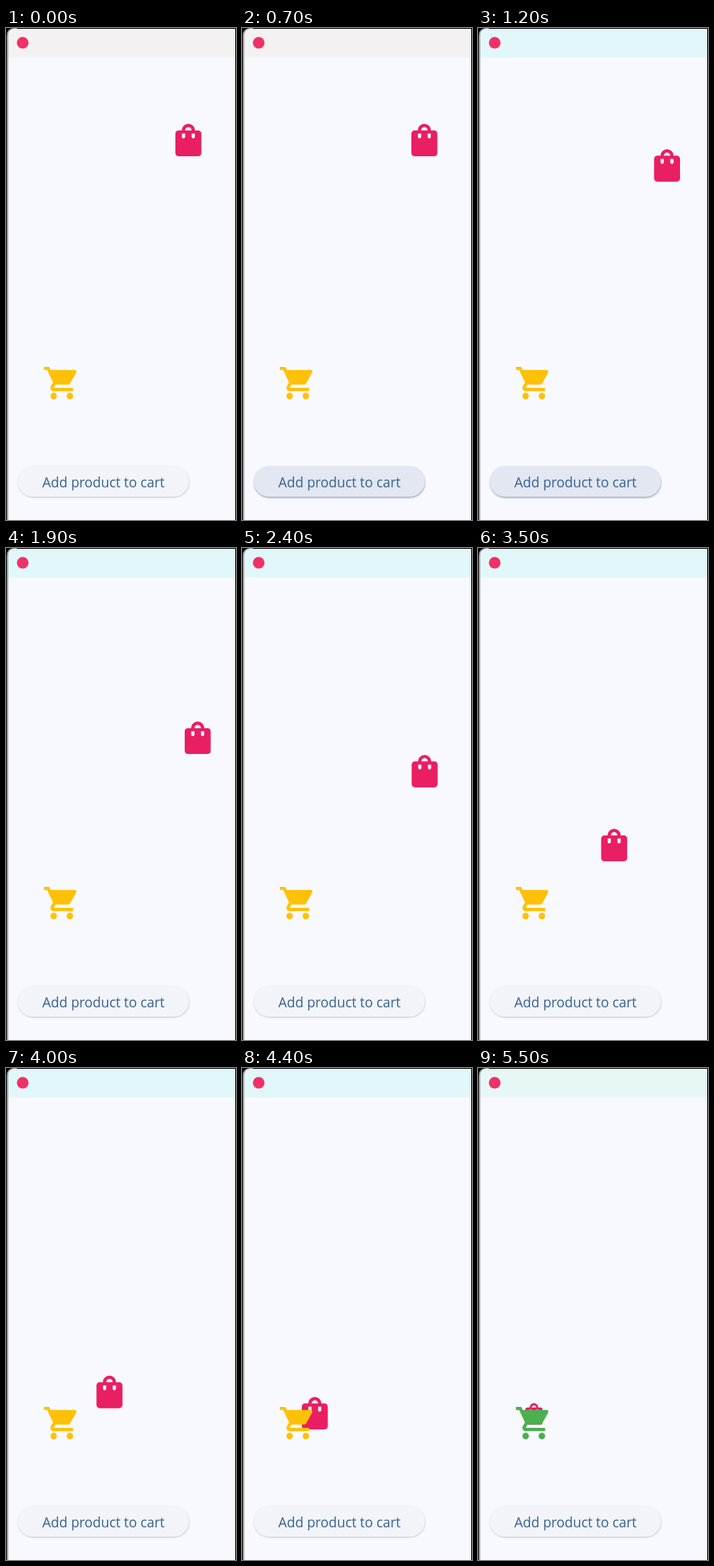
Recreate the animation shown at these times as an HTML page. Size 296 by 633 pixels, loop 5.6 s.

```html
<!DOCTYPE html>
<html lang="en">
<head>
<meta charset="utf-8">
<title>Add product to cart</title>
<style>
  html, body { margin: 0; height: 100%; overflow: hidden; background: #000; }
  svg { display: block; }
  text { font: 500 17.4px "Open Sans", "Noto Sans", sans-serif; fill: #36618e; text-anchor: middle; }
</style>
</head>
<body>
<svg width="296" height="633" viewBox="0 0 296 633">
  <defs>
    <clipPath id="window"><path d="M3 633V10Q3 1 12 1H295V633Z"/></clipPath>
    <filter id="blur" x="-10%" y="-30%" width="120%" height="160%"><feGaussianBlur stdDeviation="1"/></filter>
  </defs>
  <path d="M1 633V10Q1 0 11 0H14V633Z" fill="#a3a3a3"/>
  <g clip-path="url(#window)">
    <rect width="296" height="633" fill="#f8f9ff"/>
    <rect id="header" width="296" height="38"/>
  </g>
  <circle cx="21.5" cy="19" r="7.5" fill="#ee3167"/>

  <rect id="shadow" x="15.5" y="565" width="220" height="39" rx="19.5" filter="url(#blur)"/>
  <rect id="button" x="15" y="563.5" width="220.5" height="39.5" rx="19.75"/>
  <text x="125.5" y="591">Add product to cart</text>

  <path id="bag" fill="#e91e63" d="M18 6h-2c0-2.21-1.79-4-4-4S8 3.79 8 6H6c-1.1 0-2 .9-2 2v12c0 1.1.9 2 2 2h12c1.1 0 2-.9 2-2V8c0-1.1-.9-2-2-2zm-8 4c0 .55-.45 1-1 1s-1-.45-1-1V8h2v2zm2-6c1.1 0 2 .9 2 2h-4c0-1.1.9-2 2-2zm4 6c0 .55-.45 1-1 1s-1-.45-1-1V8h2v2z"/>
  <g transform="translate(46.7 431.7) scale(2.09)">
    <g id="cart">
      <circle cx="7" cy="20" r="2"/>
      <circle cx="17" cy="20" r="2"/>
      <path d="M15.55 13c.75 0 1.41-.41 1.75-1.03l3.58-6.49c.37-.66-.11-1.48-.87-1.48H5.21l-.94-2H1v2h2l3.6 7.59-1.35 2.44C4.52 15.37 5.48 17 7 17h12v-2H7.42q-.4-.1-.22-.37L8.1 13h7.45z"/>
    </g>
    <path id="basket" d="M6.16 6h12.15l-2.76 5H8.53L6.16 6z"/>
  </g>
</svg>
<script>
const LOOP = 5600, STEP = 100, DROP = 4700;
const el = id => document.getElementById(id);
const set = (id, name, value) => el(id).setAttribute(name, value);

// Waypoints of the bag's top left corner: time, x, y
const route = [
  [900, 218, 123.3], [1200, 226.6, 156], [1500, 230.8, 189], [1900, 230, 223.3],
  [2100, 227.2, 240.3], [2700, 209.5, 292], [2900, 201.4, 308.3], [3300, 172.3, 346],
  [3500, 158.5, 361.3], [3900, 126.3, 389], [4400, 77, 423.2], [4500, 68.3, 428.2], [4600, 60, 432]
];

function bagAt(t) {
  if (t <= route[0][0]) return route[0].slice(1);
  const next = route.findIndex(p => p[0] >= t);
  const [t0, x0, y0] = route[next - 1], [t1, x1, y1] = route[next];
  const k = (t - t0) / (t1 - t0);
  return [x0 + (x1 - x0) * k, y0 + (y1 - y0) * k];
}

function draw(now) {
  const t = Math.floor(now % LOOP / STEP) * STEP;
  const dropped = t >= DROP, hover = t >= 700 && t < 1400;
  const [x, y] = dropped ? [60.9, 431.2] : bagAt(t);
  const size = dropped ? 1.39 : 2.09;
  set("bag", "transform", `translate(${x} ${y}) scale(${size}) translate(-4 -2)`);

  const cartColor = dropped ? "#4caf50" : "#ffc107";
  set("cart", "fill", cartColor);
  // The basket opens up once the bag is inside
  set("basket", "fill", dropped ? "none" : cartColor);
  // Hides the seam between the basket and the frame
  set("basket", "stroke", dropped ? "none" : cartColor);
  set("basket", "stroke-width", .3);

  set("header", "fill", t < 1000 ? "#f3f1f2" : t < 5500 ? "#e2f7f9" : "#e7f7f6");
  set("button", "fill", hover ? "#e2e7f1" : "#f2f4fa");
  set("shadow", "fill", hover ? "#9ea3b0" : "#b9bbc2");
  set("shadow", "y", hover ? 565.5 : 564.7);
}

function tick() {
  draw(performance.now());
  requestAnimationFrame(tick);
}
tick();
</script>
</body>
</html>
```
